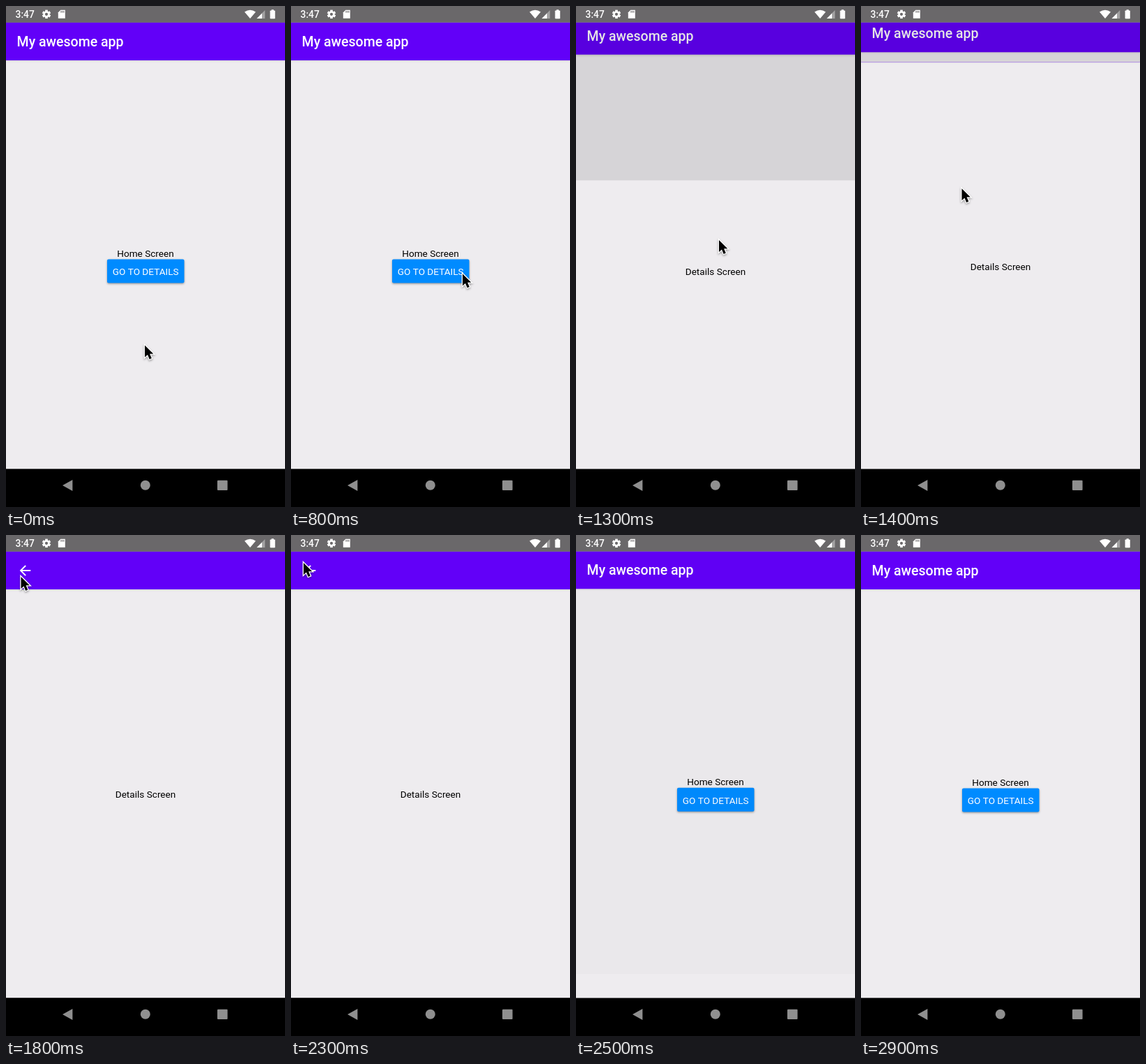
An HTML page with a canvas for the animation above (3000 ms loop, 400x719 px).

```html
<!DOCTYPE html>
<html lang="en">
<head>
<meta charset="utf-8">
<title>Screen transition</title>
<style>
  html, body { margin: 0; width: 100%; height: 100%; overflow: hidden; background: #000; }
  canvas { display: block; width: 400px; height: 719px; }
</style>
</head>
<body>
<canvas id="stage" width="400" height="719"></canvas>
<script>
const ctx = document.getElementById('stage').getContext('2d');
const LOOP = 3000, STEP = 100;
const W = 400, TOP = 23.5, BOTTOM = 664.5, CARD = BOTTOM - TOP;
const HEADER_BOTTOM = 78;
const COLOR = {
  page: '#eeecef', header: '#6200f8', button: '#008bff',
  status: '#6a686a', nav: '#8f8f8f'
};

const backArrow = new Path2D('M20 11H7.83l5.59-5.59L12 4l-8 8 8 8 1.41-1.41L7.83 13H20z');
const pointer = new Path2D('M0 0V17L4 13.4 6.7 19.9 9.8 18.6 7.1 12.3H12.3Z');

// Pointer stops: time, x, y
const pointerStops = [
  [0, 199, 487], [200, 205, 472], [400, 232, 415], [600, 246, 386], [700, 246, 384.5],
  [1200, 246, 384.5], [1300, 205, 336], [1400, 144.5, 262], [1500, 86, 168],
  [1600, 43, 95], [1700, 24, 64], [1800, 21.5, 60], [2200, 21.5, 60],
  [2300, 18, 40], [2400, 8.5, -4.5], [2500, 2, -30]
];

const clamp = v => Math.max(0, Math.min(1, v));
const cubic = (a, b, s) => 3 * (1 - s) ** 2 * s * a + 3 * (1 - s) * s * s * b + s ** 3;

// Steep start, long settle: cubic-bezier(.208, .82, .25, 1)
function ease(x) {
  if (x <= 0 || x >= 1) return clamp(x);
  let lo = 0, hi = 1;
  for (let i = 0; i < 24; i++) {
    const mid = (lo + hi) / 2;
    if (cubic(0.20833, 0.25, mid) < x) lo = mid; else hi = mid;
  }
  return cubic(0.82, 1, lo);
}

function revealAt(t) {
  return t < 2000 ? ease((t - 1217) / 425) : 1 - ease((t - 2346) / 300);
}

function pressAt(t) {
  return t >= 1100 && t < 1300 ? (t < 1200 ? 0.5 : 1) : 0;
}

function rect(x, y, w, h, fill) {
  ctx.fillStyle = fill;
  ctx.fillRect(x, y, w, h);
}

function roundRect(x, y, w, h, r, fill) {
  ctx.fillStyle = fill;
  ctx.beginPath();
  ctx.roundRect(x, y, w, h, r);
  ctx.fill();
}

function polygon(fill, ...points) {
  ctx.fillStyle = fill;
  ctx.beginPath();
  points.forEach(([x, y]) => ctx.lineTo(x, y));
  ctx.fill();
}

function disc(x, y, r, fill) {
  ctx.fillStyle = fill;
  ctx.beginPath();
  ctx.arc(x, y, r, 0, Math.PI * 2);
  ctx.fill();
}

function label(text, x, y, size, { weight = 400, color = '#000', align = 'center' } = {}) {
  ctx.font = `${weight} ${size}px Roboto, sans-serif`;
  ctx.fillStyle = color;
  ctx.textAlign = align;
  ctx.fillText(text, x, y);
}

function withShadow(color, blur, dy, draw) {
  ctx.save();
  ctx.shadowColor = color;
  ctx.shadowBlur = blur;
  ctx.shadowOffsetY = dy;
  draw();
  ctx.restore();
}

function drawPage() {
  rect(0, TOP, W, CARD + 20, COLOR.page);
  withShadow('rgba(0,0,0,.16)', 3, 1, () =>
    rect(0, TOP, W, HEADER_BOTTOM - TOP, COLOR.header));
}

function drawHome(press) {
  drawPage();
  label('My awesome app', 15.6, 58, 19.5, { weight: 500, color: '#fff', align: 'left' });
  label('Home Screen', 200, 359.5, 13.6);
  withShadow('rgba(0,0,0,.38)', 3 + 2 * press, 1.3 + press, () =>
    roundRect(145, 363.5, 110.5, 34, 2, COLOR.button));
  if (press) roundRect(145, 363.5, 110.5, 34, 2, `rgba(0,0,0,${0.145 * press})`);
  label('GO TO DETAILS', 200.2, 386.3, 13.6, { color: '#fff' });
}

function drawDetails() {
  drawPage();
  ctx.save();
  ctx.translate(15.8, 39.4);
  ctx.scale(0.973, 0.973);
  ctx.fillStyle = '#fff';
  ctx.fill(backArrow);
  ctx.restore();
  label('Details Screen', 200, 376.8, 13.6);
}

function drawScreens(t) {
  const shown = revealAt(t);
  ctx.save();
  ctx.beginPath();
  ctx.rect(0, TOP, W, CARD);
  ctx.clip();
  if (shown < 1) {
    ctx.save();
    ctx.translate(0, -0.02 * CARD * shown);
    drawHome(pressAt(t));
    ctx.restore();
    rect(0, TOP, W, CARD, `rgba(0,0,0,${0.1 * clamp(shown / 0.36)})`);
  }
  if (shown > 0) {
    const hidden = CARD * (1 - shown);
    ctx.beginPath();
    ctx.rect(0, TOP + hidden, W, CARD);
    ctx.clip();
    ctx.translate(0, 0.041 * hidden);
    drawDetails();
  }
  ctx.restore();
}

function drawGear(x, y) {
  ctx.save();
  ctx.translate(x, y);
  for (let i = 0; i < 3; i++) {
    rect(-1.8, -6.2, 3.6, 12.4, '#fff');
    ctx.rotate(Math.PI / 3);
  }
  disc(0, 0, 4.6, '#fff');
  disc(0, 0, 2.1, COLOR.status);
  ctx.restore();
}

function drawStatusBar() {
  rect(0, 0, W, TOP, COLOR.status);
  label('3:47', 13.6, 17, 13.8, { weight: 500, color: '#fff', align: 'left' });
  drawGear(58, 11.8);
  polygon('#fff', [78.3, 5.7], [84.8, 5.7], [84.8, 17.8], [74.8, 17.8], [74.8, 9.2]);
  [78.4, 80.4, 82.4].forEach(x => rect(x, 7, 1, 2.6, COLOR.status));

  ctx.fillStyle = '#fff';
  ctx.beginPath();
  ctx.moveTo(350, 18);
  ctx.lineTo(342, 8.6);
  ctx.quadraticCurveTo(350, 2.8, 358, 8.6);
  ctx.fill();

  polygon('rgba(255,255,255,.38)', [371.3, 6], [371.3, 18], [359.5, 18]);
  polygon('#fff', [367, 10.4], [367, 18], [359.5, 18]);
  roundRect(378.6, 6.5, 7.2, 11.7, 0.8, '#fff');
  rect(380.6, 5.2, 3.2, 2, '#fff');
}

function drawNavBar() {
  rect(0, BOTTOM, W, 719 - BOTTOM, '#000');
  polygon(COLOR.nav, [81, 688], [95.4, 680], [95.4, 696]);
  disc(199.8, 687.8, 7, COLOR.nav);
  roundRect(303, 680.8, 14.6, 14.2, 1, COLOR.nav);
}

function drawPointer(t) {
  const next = pointerStops.findIndex(stop => stop[0] > t);
  if (next < 0) return;
  const [t0, x0, y0] = pointerStops[next - 1];
  const [t1, x1, y1] = pointerStops[next];
  const k = (t - t0) / (t1 - t0);
  ctx.save();
  ctx.translate(x0 + (x1 - x0) * k, y0 + (y1 - y0) * k);
  ctx.lineWidth = 2.6;
  ctx.strokeStyle = '#fff';
  withShadow('rgba(0,0,0,.35)', 3, 1.5, () => ctx.stroke(pointer));
  ctx.fillStyle = '#000';
  ctx.fill(pointer);
  ctx.restore();
}

function render() {
  const t = Math.floor((performance.now() % LOOP) / STEP) * STEP;
  drawScreens(t);
  drawStatusBar();
  drawNavBar();
  drawPointer(t);
  requestAnimationFrame(render);
}

render();
</script>
</body>
</html>
```
